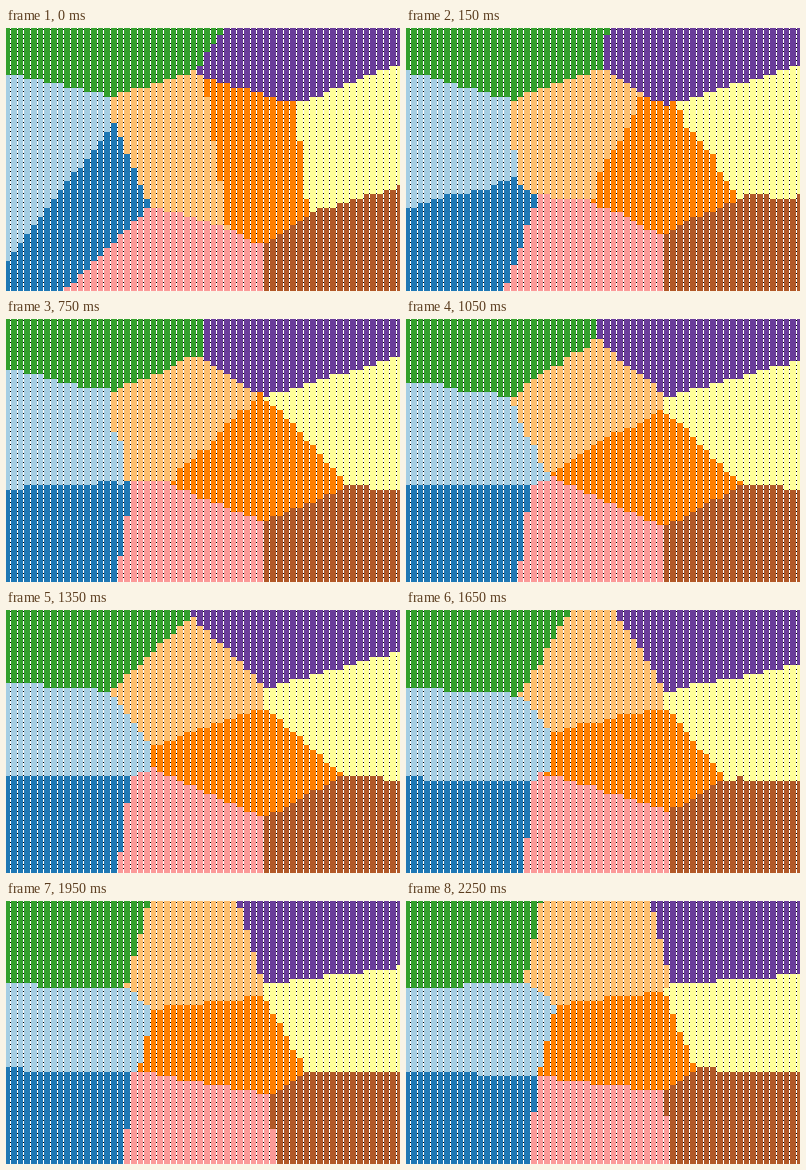
A matplotlib script for the animation above (2400 ms loop, 394x263 px).

```python
import numpy as np
import matplotlib as mpl
import matplotlib.pyplot as plt
from matplotlib.animation import FuncAnimation
from matplotlib.path import Path

W, H, DPI = 394, 263, 100
N = 60                       # grid points per side
K = 9                        # clusters
FRAMES, STEP_MS = 16, 150
PITCH_X, PITCH_Y = 6.65, 4.435
LEFT, TOP = -1.5, -2.17      # corner of the first marker
PAD = 9                      # regions reach this far past the stage

COLORS = mpl.colormaps["Paired"](np.linspace(0, 1, K))[:, :3]
CORNERS = {"w": (-PAD, -PAD), "x": (W + PAD, -PAD),
           "y": (W + PAD, H + PAD), "z": (-PAD, H + PAD)}

# Region outlines, spelled with the names of their corner points.
SPLIT = "ABMN NMLOz wDCBA OLKJP BCEKLM EFHJK DxGFEC GIHF IyPJH".split()
TOUCH = "ABMKLN NLOz wDCBA OLKJP BCEFM MFHJK DxGEC EGIHF IyPJH".split()
OPEN = "ABMKLN NLOz wDBA OLKJP DSEFMB MFHJK SxGE EGIHF IyPJH".split()

# Clusterings passed through: step -> (outlines, points).
STAGES = {
    0: (SPLIT, dict(
        A=(-9, 43), B=(107, 69), C=(190, 42), D=(227, -9), E=(198, 49),
        F=(290, 76), G=(403, 32.5), H=(303, 185), I=(403, 156),
        J=(258, 219), K=(222, 200), L=(144, 177), M=(108, 95),
        N=(-9, 246), O=(51, 272), P=(258, 272))),
    3: (SPLIT, dict(
        A=(-9, 40), B=(106, 72), C=(200, 39), D=(200, -9), E=(248, 74),
        F=(262, 77), G=(403, 35), H=(343, 167), I=(403, 172),
        J=(259, 203), K=(170, 168), L=(127, 167), M=(110, 163),
        N=(-9, 170), O=(109, 272), P=(258, 272))),
    9: (TOUCH, dict(
        A=(-9, 71), B=(105, 81), C=(186, 6), D=(188, -9), E=(261, 78),
        F=(260, 97), G=(403, 39), H=(337, 166), I=(403, 170),
        J=(259, 208), K=(146, 158), L=(125, 168), M=(147, 136),
        N=(-9, 167), O=(111, 272), P=(258, 272))),
    13: (OPEN, dict(
        A=(-9, 83), B=(120, 87), D=(146, -9), S=(229, -9), E=(258, 83),
        F=(258, 95), G=(403, 65), H=(301, 170), I=(403, 172),
        J=(266, 194), K=(133, 170), L=(127, 171), M=(148, 108),
        N=(-9, 168), O=(117, 272), P=(270, 272))),
}
# Easing exponent on the way out of a stage: fast start, slow start, even.
PACE = {0: 0.35, 3: 1.25, 9: 1.0}

rows, cols = np.mgrid[0:N, 0:N]
grid = np.column_stack([cols.ravel(), rows.ravel()])
spots = (grid + 0.5) * (PITCH_X, PITCH_Y) + (LEFT, TOP)
gx, gy = grid.T.astype(np.float32)
apart = np.hypot(gx[:, None] - gx, gy[:, None] - gy)


def labels_from(outlines, points):
    points = {**CORNERS, **points}
    labels = np.zeros(N * N, int)
    for k, names in enumerate(outlines):
        shape = Path([points[n] for n in names])
        labels[shape.contains_points(spots)] = k
    return labels


def depth_fields(labels):
    """Signed distance of every grid point to each region's border."""
    reach = np.array([apart[:, labels == k].min(axis=1) for k in range(K)])
    return np.array([np.delete(reach, k, axis=0).min(axis=0) - reach[k]
                     for k in range(K)])


def kmeans_step(labels):
    centers = np.array([grid[labels == k].mean(axis=0) for k in range(K)])
    gaps = grid[:, None, :] - centers
    return (gaps ** 2).sum(axis=2).argmin(axis=1)


def all_labels():
    keys = sorted(STAGES)
    fields = {i: depth_fields(labels_from(*STAGES[i])) for i in keys}
    steps = []
    for a, b in zip(keys, keys[1:]):
        for i in range(a, b):
            t = ((i - a) / (b - a)) ** PACE[a]
            mix = (1 - t) * fields[a] + t * fields[b]
            steps.append(mix.argmax(axis=0))
    steps.append(fields[keys[-1]].argmax(axis=0))
    while len(steps) < FRAMES:
        steps.append(kmeans_step(steps[-1]))
    return [s.reshape(N, N) for s in steps]


# Marker edges snap to whole pixels; a dotted seam parts the columns.
lefts = np.round(LEFT + PITCH_X * np.arange(N)).astype(int)
tops = np.round(TOP + PITCH_Y * np.arange(N)).astype(int)
px, py = np.arange(W), np.arange(H)
col_at = np.searchsorted(lefts, px, side="right") - 1
row_at = np.searchsorted(tops, py, side="right") - 1
seam = np.isin(px + 1, lefts)
dotted = np.isin(py + 1, tops)


def picture(labels):
    image = COLORS[labels[np.ix_(row_at, col_at)]]
    image[:, seam] = 1
    image[np.ix_(dotted, seam)] = 0
    return image


steps = all_labels()
fig = plt.figure(figsize=(W / DPI, H / DPI), dpi=DPI)
ax = fig.add_axes([0, 0, 1, 1])
ax.axis("off")
stage = ax.imshow(picture(steps[0]), extent=(0, W, H, 0),
                  interpolation="nearest", aspect="auto")


def update(i):
    stage.set_data(picture(steps[i]))
    return (stage,)


anim = FuncAnimation(fig, update, frames=FRAMES, interval=STEP_MS, repeat=True)
plt.show()
```
